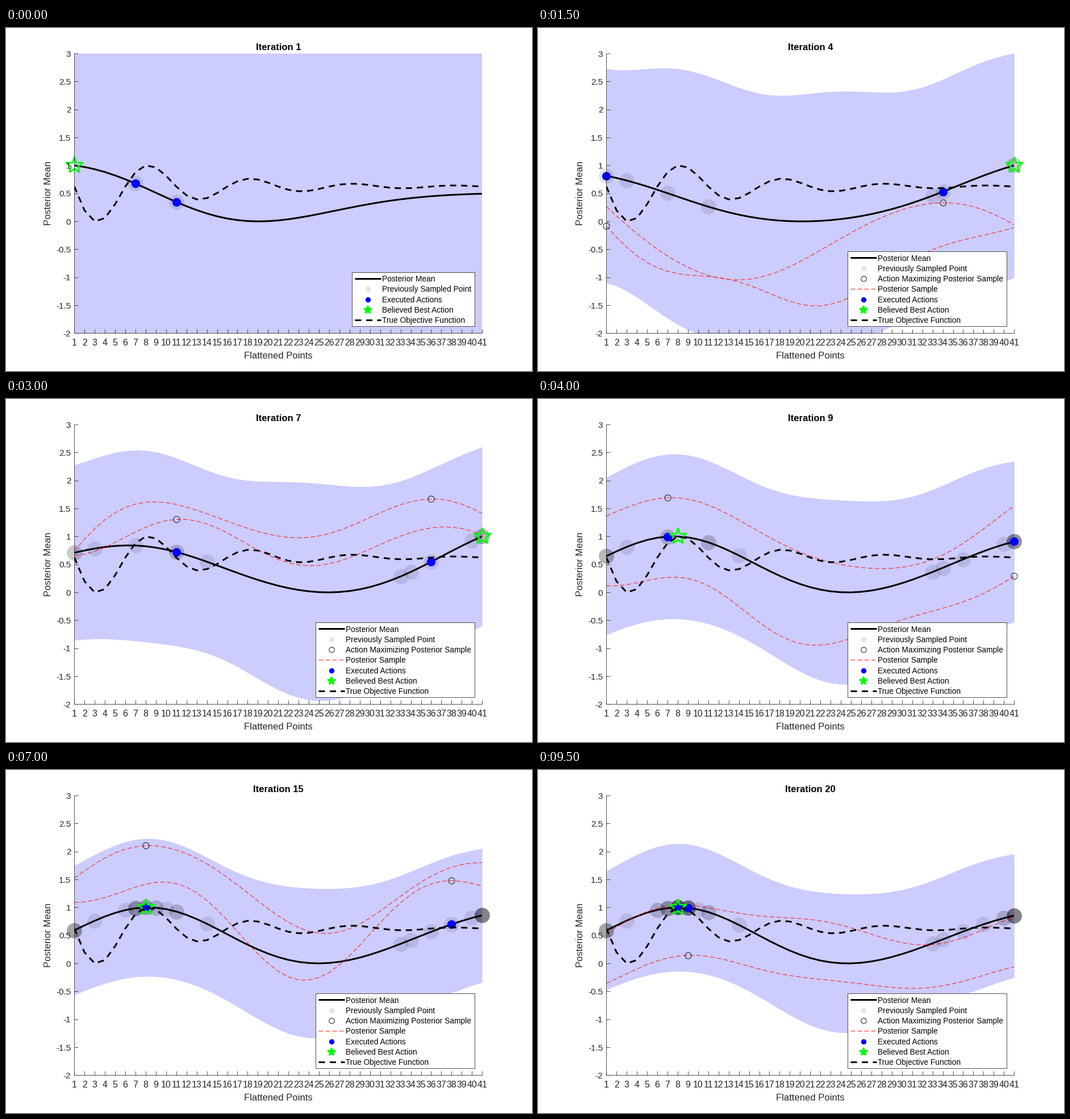
Recreate the animation shown at these times as a matplotlib script. Size 926 by 605 pixels, loop 10 s.

```python
import numpy as np
import matplotlib.pyplot as plt
from matplotlib.animation import FuncAnimation
from matplotlib.markers import MarkerStyle

W, H = 926, 605
DPI = 72  # one point is one pixel
ITERATIONS, INTERVAL = 20, 500
LEFT, RIGHT, TOP, BOTTOM = 120.3, 838.2, 45, 538.5
INK = "#262626"
RED, GREEN, BAND = "#ff0000", "#00ff00", "#ccccff"

LENGTH_SCALE = 10
PREFERENCE_NOISE = .05
BAND_SIGMAS = 1.85

# The pair of points tried in each iteration.
ACTIONS = [(7, 11), (41, 33), (41, 3), (34, 1), (41, 14), (1, 40), (36, 11),
           (41, 1), (7, 41), (9, 6), (10, 1), (7, 41), (8, 7), (8, 9),
           (38, 8), (8, 9), (8, 9), (40, 8), (9, 6), (8, 9)]

points = np.arange(1, 42)
elapsed = points - 1
wave = -np.exp(-.1 * elapsed) * np.sin(np.pi * elapsed / 5)
objective = (wave - wave.min()) / np.ptp(wave)
prior = np.exp(-.5 * ((points[:, None] - points) / LENGTH_SCALE) ** 2)


def preference_rows(pairs):
    """One row per pair: +1 at the better point, -1 at the worse one."""
    rows = np.zeros((len(pairs), len(points)))
    for row, (a, b) in zip(rows, pairs):
        better, worse = (a, b) if wave[a - 1] > wave[b - 1] else (b, a)
        row[better - 1], row[worse - 1] = 1, -1
    return rows


def posterior(pairs):
    """Laplace approximation of a Gaussian process seen through preferences."""
    rows = preference_rows(pairs)
    cross = rows @ prior
    gram = cross @ rows.T
    identity = np.eye(len(pairs))
    weights = np.zeros(len(pairs))
    for _ in range(150):  # damped Newton steps
        gap = np.clip(gram @ weights / PREFERENCE_NOISE, -40, 40)
        miss = 1 / (1 + np.exp(gap))
        root = np.sqrt(miss * (1 - miss)) / PREFERENCE_NOISE
        system = identity + root[:, None] * gram * root
        pull = root ** 2 * (gram @ weights) + miss / PREFERENCE_NOISE
        solved = pull - root * np.linalg.solve(system, root * (gram @ pull))
        weights += .3 * (solved - weights)
    scaled = root[:, None] * cross
    covariance = prior - scaled.T @ np.linalg.solve(system, scaled)
    return cross.T @ weights, covariance


def samples_peaking_at(actions, mean, covariance, seed):
    """For each action, a random posterior draw with its maximum there."""
    rng = np.random.default_rng(seed)
    draws = rng.multivariate_normal(mean, covariance, 2000,
                                    check_valid="ignore")
    peaks = points[draws.argmax(axis=1)]
    return [draws[np.abs(peaks - a).argmin()] for a in actions]


plt.rcParams["font.family"] = "Liberation Sans"
fig = plt.figure(figsize=((W + .01) / DPI, (H + .01) / DPI), dpi=DPI,
                 facecolor="white")
ax = fig.add_axes([LEFT / W, 1 - BOTTOM / H,
                   (RIGHT - LEFT) / W, (BOTTOM - TOP) / H])
ax.set(xlim=(1, 41), ylim=(-2, 3))
ax.patch.set_visible(False)
ax.set_axisbelow(False)
levels = np.arange(-2, 3.1, .5)
ax.set_xticks(points, [str(p) for p in points])
ax.set_yticks(levels, [f"{v:g}" for v in levels])
ax.tick_params(direction="in", length=7, width=.8, color=INK, labelcolor=INK)
ax.tick_params(axis="x", pad=9, labelsize=16)
ax.tick_params(axis="y", pad=6, labelsize=15.3)
for side in ("top", "right"):
    ax.spines[side].set_visible(False)
for side in ("left", "bottom"):
    ax.spines[side].set(color=INK, linewidth=.8)

page = fig.add_axes([0, 0, 1, 1], zorder=5)
page.set(xlim=(0, W), ylim=(H, 0))
page.axis("off")
page.text(479.3, 583, "Flattened Points", size=16.6, color=INK, ha="center")
page.text(78.5, 291.7, "Posterior Mean", size=16.6, color=INK, ha="center",
          va="baseline", rotation=90, rotation_mode="anchor")
title = page.text(479.3, 38.5, "", size=16.6, weight="bold", ha="center")


def dashes(width, on, off):
    return dict(lw=width, ls=(0, (on / width, off / width)))


def dot(radius, **style):
    return dict(ls="none", marker="o", ms=2 * radius, mew=0) | style


def star(radius, width):
    return dict(ls="none", marker=MarkerStyle("*", joinstyle="miter"),
                ms=2 * radius, mfc="none", mec=GREEN, mew=width)


SOLID = dict(color="black", lw=3)
DASHED = dict(color="black") | dashes(3, 11, 8.5)
THIN = dict(color=RED) | dashes(.9, 8, 4)
RING = dict(mfc="none", mec="black", mew=.9)
GRAY = dict(mfc="black", alpha=.1)
BLUE = dict(mfc="blue")

drawn = []


def put(target, x, y, **style):
    drawn.extend(target.plot(x, y, **style))


def mark(x, y, **style):
    """Markers may hang over the edge, but only where their centre is inside."""
    x, y = np.atleast_1d(x), np.atleast_1d(y)
    inside = (y >= -2) & (y <= 3)
    put(ax, x[inside], y[inside], clip_on=False, **style)


def draw_legend(has_samples):
    rows = [("Posterior Mean", SOLID),
            ("Previously Sampled Point", dot(4.7, **GRAY)),
            ("Executed Actions", dot(4.7, **BLUE)),
            ("Believed Best Action", star(7, 2.4) | dict(mfc=GREEN)),
            ("True Objective Function", DASHED)]
    if has_samples:
        rows[2:2] = [("Action Maximizing Posterior Sample", dot(4.7, **RING)),
                     ("Posterior Sample", THIN)]
    left, top = (545, 394) if has_samples else (609, 431)
    drawn.append(page.add_patch(plt.Rectangle(
        (left + .3, top + .3), 825 - left, 525.3 - top,
        fc="white", ec=INK, lw=.8)))
    for i, (label, style) in enumerate(reversed(rows)):
        y = 515.3 - 18.3 * i
        x = [left + 27.5] if "marker" in style else [left + 5, left + 50.5]
        put(page, x, [y] * len(x), solid_capstyle="butt", **style)
        drawn.append(page.text(left + 53, y + 5, label, size=13.8))


def update(frame):
    n = frame + 1
    while drawn:
        drawn.pop().remove()
    title.set_text(f"Iteration {n}")

    raw_mean, covariance = posterior(ACTIONS[:n])
    low, span = raw_mean.min(), np.ptp(raw_mean)
    mean = (raw_mean - low) / span
    width = BAND_SIGMAS * np.sqrt(np.diag(covariance)) / span
    actions = np.array(ACTIONS[frame])
    sampled = np.array(ACTIONS[:n]).ravel()
    best = mean.argmax()

    drawn.append(ax.fill_between(points, mean - width, mean + width,
                                 color=BAND, lw=0))
    put(ax, points, mean, **SOLID)
    mark(sampled, mean[sampled - 1], **dot(13.4, **GRAY))
    if n > 1:
        for draw in samples_peaking_at(actions, raw_mean, covariance, n):
            sample = (draw - low) / span
            peak = sample.argmax()
            put(ax, points, sample, **THIN)
            mark(points[peak], sample[peak], **dot(5.5, **RING))
    mark(actions, mean[actions - 1], **dot(7.6, **BLUE))
    mark(points[best], mean[best], **star(15.3, 2.8))
    put(ax, points, objective, **DASHED)
    draw_legend(n > 1)
    return drawn


anim = FuncAnimation(fig, update, frames=ITERATIONS, interval=INTERVAL,
                     init_func=lambda: [], repeat=True, repeat_delay=0,
                     blit=False)
plt.show()
```
